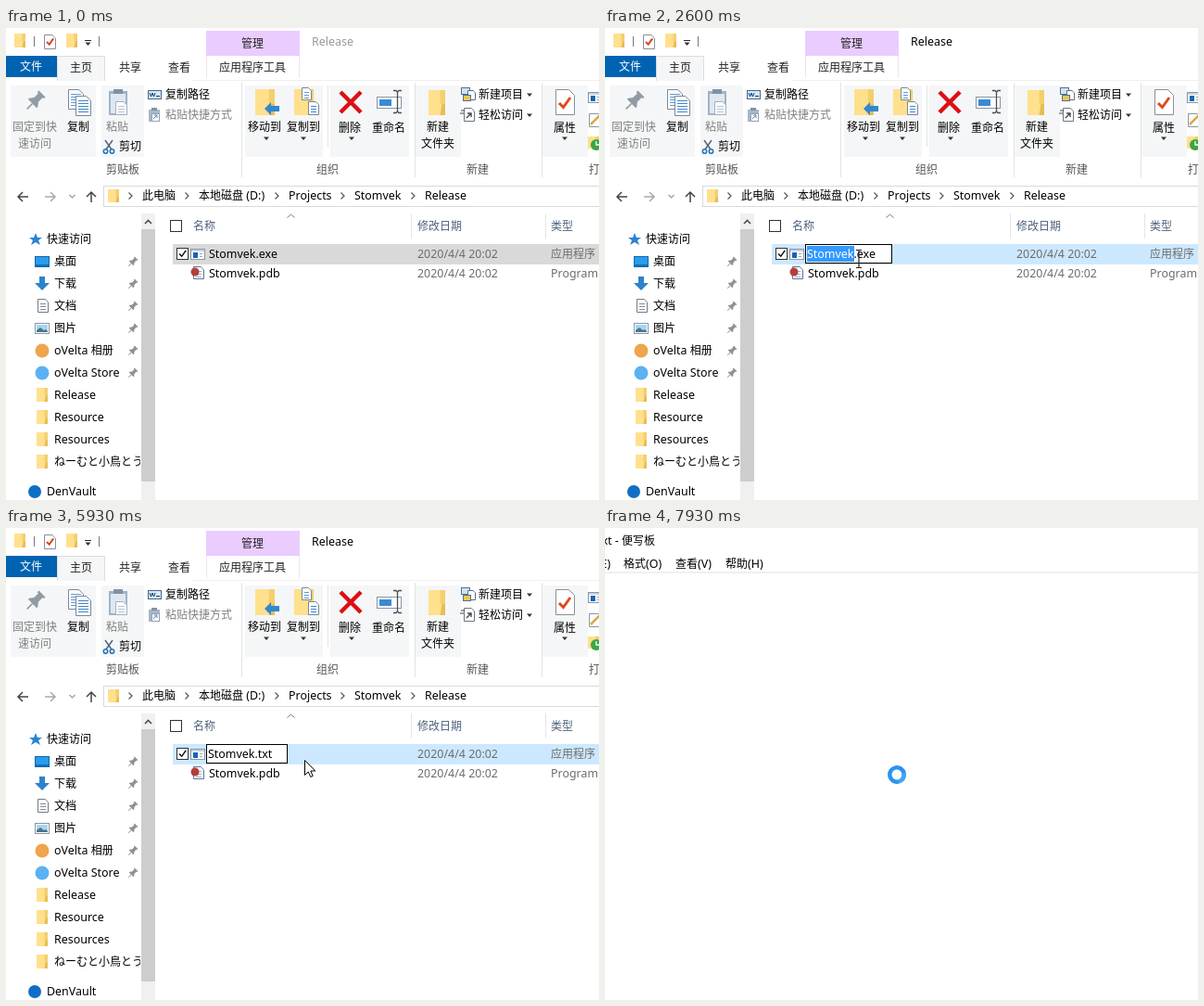
Recreate the animation shown at these times as an HTML page. Size 640 by 509 pixels, loop 8 s.

```html
<!DOCTYPE html>
<html lang="zh-CN">
<head>
<meta charset="utf-8">
<style>
html, body { margin: 0; width: 100%; height: 100%; overflow: hidden; background: #fff; }
svg { display: block; width: 100vw; height: 100vh; }
text { font: 12px "Noto Sans", "Noto Sans CJK SC", "Noto Sans CJK", sans-serif; white-space: pre; }
.l { font-size: 12.45px; }
.ime text { font: 17px "Liberation Mono", "Noto Sans CJK SC", "Noto Sans CJK", monospace; }
.ime .l { font-size: 15px; }
.ime .typed { font-weight: bold; font-size: 16px; }
</style>
</head>
<body>
<svg id="stage" viewBox="0 0 640 509" preserveAspectRatio="none"></svg>
<script>
const NAME = 'Stomvek';
const FPS = 15, FRAMES = 120;
const GREY = '#6d6d6d', DIM = '#808080', BLUE = '#1f74b8';

// ---- drawing helpers ----
const rect = (x, y, w, h, fill, more = '') => `<rect x="${x}" y="${y}" width="${w}" height="${h}" fill="${fill}" ${more}/>`;
const path = (d, fill, more = '') => `<path d="${d}" fill="${fill}" ${more}/>`;
const line = (d, color, w = 1, more = '') => path(d, 'none', `stroke="${color}" stroke-width="${w}" ${more}`);
const dot = (x, y, r, fill, more = '') => `<circle cx="${x}" cy="${y}" r="${r}" fill="${fill}" ${more}/>`;
const group = (id, body, more = '') => `<g id="${id}" ${more}>${body}</g>`;
const each = (list, fn) => list.map(fn).join('');
const runs = s => s.replace(/[\x20-\x7e]+/g, m => `<tspan class="l">${m}</tspan>`);
// y is the middle of the text line
const text = (x, y, s, fill = '#000', more = '') => `<text x="${x}" y="${y + 4}" fill="${fill}" ${more}>${runs(s)}</text>`;
const mid = (x, y, s, fill) => text(x, y, s, fill, 'text-anchor="middle"');

const frameBox = (x, y, w, h, color, fill = '#fff') => rect(x + .5, y + .5, w - 1, h - 1, fill, `stroke="${color}"`);
const caret = (x, y) => path(`M${x - 3} ${y - 1.5}h6l-3 3.5z`, '#333');
const chevron = (x, y, color = '#555') => line(`M${x - 1.5} ${y - 3.5}l3.5 3.5l-3.5 3.5`, color, 1.2);

function folder(x, y, w, h) {
  return rect(x, y, w, h, '#f3cf6e') + path(`M${x} ${y}h${w * .7}v${h * .55}h${w * .3}v${h * .45}h${-w}z`, '#ffe08c')
    + path(`M${x + w * .8} ${y + h * .55}h${w * .2}v${h * .45}h${-w * .3}z`, '#e8bd55');
}
function page(x, y, w, h, color = '#8a8f96', ink = '') {
  const f = w * .3;
  let s = path(`M${x + .5} ${y + .5}h${w - f}l${f} ${f}v${h - f}h${-w}z`, '#fff', `stroke="${color}"`);
  if (ink) for (let i = y + 5; i < y + h - 1; i += 3) s += rect(x + 3, i, w - 5, 1, ink);
  return s;
}
const tick = (x, y, s, color, w) => line(`M${x} ${y}l${3 * s} ${3 * s}l${5 * s} ${-7 * s}`, color, w);
const pin = (x, y, s, color) => `<g transform="translate(${x} ${y}) rotate(45) scale(${s})">`
  + path('M-3-6h6v1.5h-1v4l2 2.5v1h-8v-1l2-2.5v-4h-1z', color) + rect(-.5, 3, 1, 5, color) + '</g>';
const checkbox = (x, y) => frameBox(x, y, 13, 13, '#333');
const exeIcon = (x, y) => frameBox(x, y, 16, 12, '#8b96a3') + rect(x + 1, y + 1, 14, 2, '#c9d3dd')
  + rect(x + 3, y + 4, 5, 6, '#1565b5') + rect(x + 10, y + 5, 3, 1, '#9aa') + rect(x + 10, y + 8, 3, 1, '#9aa');

// ---- window chrome ----
function titleBar() {
  return folder(9, 6, 12, 15) + rect(30, 9, 1, 11, '#777')
    + page(41, 7, 12, 15) + tick(44, 15, .9, '#d8481f', 2)
    + folder(65, 6, 12, 15) + rect(85, 13, 7, 1, '#222') + caret(88.5, 17) + rect(100, 9, 1, 11, '#777')
    + group('tools', rect(216, 3, 101, 27, '#eaccff') + mid(266, 17, '管理', '#222')
      + rect(216, 30, 1, 24, '#efe3f7') + rect(316, 30, 1, 24, '#efe3f7') + mid(266, 43, '应用程序工具', '#222'))
    + text(330, 15, 'Release', '#999', 'id="title"');
}

function ribbon() {
  let s = rect(0, 30, 55, 23, '#0063b1') + mid(27, 42, '文件', '#fff')
    + rect(201, 56, 439, 1, '#f0f0f1')
    + path('M55.5 57V30.5h51V57', '#f5f6f7', 'stroke="#dcdddf"') + mid(81, 43, '主页', '#222')
    + mid(134, 43, '共享', '#222') + mid(187, 43, '查看', '#222');
  s += each([[5, 92, 77], [103, 46, 77], [258, 84, 77], [350, 85, 77], [442, 49, 77], [578, 50, 77]],
    ([x, w, h]) => rect(x, 62, w, h, '#f5f6f7'));
  s += each([254, 441, 578], x => rect(x, 59, 1, 102, '#e2e3e4')) + rect(347, 62, 1, 66, '#e2e3e4');
  s += each([[126, '剪贴板'], [347, '组织'], [509, '新建']], ([x, t]) => mid(x, 153, t, '#555')) + text(629, 153, '打开', '#555');

  // clipboard group
  s += pin(32, 78, 1.65, '#929ba4') + mid(31, 107, '固定到快', DIM) + mid(31, 125, '速访问', DIM);
  s += page(67, 66, 16, 21, '#7b8794', '#5b9bd5') + page(75, 73, 16, 21, '#7b8794', '#3c86cc') + mid(78, 107, '复制');
  s += rect(111, 68, 20, 26, '#9fb3c8') + rect(113, 71, 16, 21, '#dfe8f1') + rect(116, 66, 10, 5, '#7f91a5')
    + page(118, 79, 12, 14, '#9fb0c2', '#b4c2d1') + mid(120, 107, '粘贴', DIM);
  s += line('M107 121l7 10M115 121l-7 10', '#55657a', 1.5)
    + each([107.5, 114.5], x => dot(x, 133, 2.2, 'none', `stroke="${BLUE}" stroke-width="1.5"`)) + text(122, 128, '剪切');
  s += frameBox(153, 67, 15, 10, '#44688c', '#d7e8f7') + line('M155 70l1.5 4l1.5-4l1.5 4l1.5-4', '#123f6b') + rect(162, 73, 4, 1, '#123f6b')
    + text(172, 72, '复制路径');
  s += rect(154, 88, 12, 13, '#a9b6c4') + rect(157, 86, 6, 3, '#8492a2') + frameBox(157, 92, 9, 9, '#8fa2b5') + line('M159 98l4-4m-3 0h3v3', '#5b86b0')
    + text(172, 94, '粘贴快捷方式', DIM);

  // organise group
  s += folder(269, 66, 21, 28) + path('M279 87l7-7v4h9v6h-9v4z', '#3487cf') + mid(279, 107, '移动到') + caret(281, 119);
  s += folder(311, 66, 21, 28) + page(319, 64, 10, 13, '#7b8794', '#5b9bd5') + page(326, 79, 11, 14, '#7b8794', '#3c86cc')
    + mid(321, 107, '复制到') + caret(321, 119);
  s += line('M361 69l22 22M383 69l-22 22', '#dc0f14', 4.5) + mid(371, 108, '删除') + caret(373, 119);
  s += frameBox(400, 74, 27, 13, '#8795a5') + rect(403, 77, 13, 7, '#3b8ad0')
    + line('M418 67.5h3l1.5 1.5l1.5-1.5h3M422.500 69v21M418 91.500h3l1.500-1.500l1.500 1.500h3', '#4a4f55', 1.3) + mid(413, 108, '重命名');

  // new and open groups
  s += folder(456, 67, 18, 27) + mid(466, 107, '新建') + mid(466, 125, '文件夹');
  s += frameBox(491, 64, 10, 8, '#55708c', '#cfe3f5') + page(498, 67, 8, 10, '#55708c') + frameBox(493, 72, 9, 7, '#55708c', '#e9c75d')
    + text(510, 72, '新建项目') + caret(565, 72);
  s += page(494, 86, 11, 14, '#6b7684') + line('M497 97l5-5m-4 0h4v4', '#444', 1.4) + line('M491 89h4M490 92h4', '#444')
    + text(510, 94, '轻松访问') + caret(565, 94);
  s += page(593, 66, 20, 27) + tick(597, 81, 1.5, '#dd4b21', 3) + mid(603, 108, '属性') + caret(603, 119);
  s += group('openExe', exeIcon(628, 69)) + group('openTxt', rect(629, 68, 14, 13, '#45a5b5') + line('M631 71h10M631 74h10M631 77h10', '#d9f2f5'));
  s += page(629, 92, 14, 14, '#8796a6') + line('M631 104l10-10', '#d8a94a', 2.5)
    + folder(628, 117, 12, 13) + dot(637, 126, 6, '#3da545') + line('M637 122v4h3', '#fff', 1.3);
  return s;
}

function addressBar() {
  const crumbs = [[147, '此电脑', 195], [208, '本地磁盘 (D:)', 292], [305, 'Projects', 363], [376, NAME, 439], [452, 'Release']];
  return line('M24 182H13m5-5l-5 5l5 5', '#444', 1.5) + line('M42 182h11m-5-5l5 5l-5 5', '#aaa', 1.5)
    + line('M68.500 180l3 3l3-3', '#999', 1.2) + line('M92 188v-11m-5 5l5-5l5 5', '#444', 1.5)
    + frameBox(105, 170, 540, 23, '#d9d9d9') + folder(110, 174, 12, 14) + chevron(134, 181)
    + each(crumbs, ([x, t, c]) => text(x, 181, t) + (c ? chevron(c, 181) : ''));
}

function sidebar() {
  const names = ['桌面', '下载', '文档', '图片', 'oVelta 相册', 'oVelta Store', 'Release', 'Resource', 'Resources', 'ねーむと小鳥とう'];
  let s = path('M32 221l2 5h5l-4 3l2 5l-5-3l-5 3l2-5l-4-3h5z', '#2b83cf') + text(44, 228, '快速访问');
  names.forEach((n, i) => {
    const y = 252 + 24 * i;
    s += text(52, y, n, '#000', 'clip-path="url(#side)"');
    if (i < 6) s += pin(137, y, .85, '#8a9299');
    else s += folder(33, y - 8, 12, 15);
  });
  s += frameBox(31, 246, 16, 12, '#0e67ac', '#2a9cec') + rect(32, 255, 14, 2, '#1270b8');
  s += path('M36 268h6v7h5l-8 8l-8-8h5z', '#2d83cc');
  s += page(34, 292, 11, 14, '#707a85', '#7e8c9a');
  s += frameBox(31, 318, 16, 12, '#8795a3') + rect(33, 320, 12, 8, '#a9d4f1') + path('M33 328v-2l4-3l4 3l2-1l2 2v1z', '#47758f');
  s += dot(39, 348, 7.500, '#f0a44b') + dot(39, 372, 7.500, '#5cb1f3') + dot(31, 500, 7, '#0f6fc4') + text(44, 500, 'DenVault');
  return s + rect(146, 200, 15, 309, '#f0f0f0') + rect(146, 217, 15, 272, '#cdcdcd') + line('M150 211l3.500-3.500l3.500 3.500', '#505050', 1.6);
}

function fileList() {
  const head = '#4c607a', date = '2020/4/4 20:02';
  return checkbox(177, 207) + text(202, 214, '名称', head) + text(444, 214, '修改日期', head) + text(588, 214, '类型', head)
    + line('M303.500 204.500l4-3.500l4 3.500', '#777') + rect(437, 200, 1, 27, '#e5e5e5') + rect(582, 200, 1, 27, '#e5e5e5')
    + group('other', rect(180, 254, 460, 22, '#e5f3ff', 'id="hover"') + page(202, 257, 11, 13, '#5d7396', '#9db0cc')
      + dot(204, 263, 4.500, '#b2403c') + text(219, 265, NAME + '.pdb') + text(444, 265, date, GREY) + text(588, 265, 'Program Debug', GREY))
    + group('file', rect(180.5, 233.5, 470, 21, '#d9d9d9', 'id="sel"') + checkbox(184, 237) + tick(187, 243.5, .9, '#111', 1.5)
      + group('exeIcon', exeIcon(199, 238)) + group('txtIcon', page(201, 236, 11, 14, '#9a9a9a', '#a8a8a8'))
      + text(219, 244, '', '#000', 'id="name"') + text(444, 244, date, GREY) + text(588, 244, '', GREY, 'id="kind"'))
    + group('edit', frameBox(216, 233, 94, 21, '#000').replace('<rect', '<rect id="editBox"')
      + rect(218, 235, 51, 17, '#3399ff', 'id="mark"') + text(218, 244, '', '#000', 'id="editText"')
      + rect(292, 235, 1, 17, '#000', 'id="caret"'));
}

// ---- input method panel ----
function flower(x, y, r) {
  let s = '';
  for (let i = 0; i < 5; i++)
    s += `<ellipse cy="${-r * .58}" rx="${r * .36}" ry="${r * .46}" fill="#fbfcfd" stroke="#b9c3cc" stroke-width=".7" transform="rotate(${72 * i + 15})"/>`;
  return `<g transform="translate(${x} ${y})">${s}${dot(0, 0, r * .2, '#cfd6dc')}</g>`;
}
function imePanel() {
  let s = rect(303, 268, 360, 62, '#8e9aa5', 'rx="9" opacity=".45"') + rect(304.5, 267.5, 360, 60, 'url(#sky)', 'rx="8" stroke="#d9eefb" stroke-width="1.500"');
  for (let i = 0; i < 26; i++)
    s += dot(396 + (i * 67) % 244, 274 + (i * 29) % 50, 1.5 + i % 3, '#d5effd', 'opacity=".6"');
  s += rect(392, 299, 250, 21, '#d2ebfa', 'opacity=".6"') + rect(308, 325, 332, 1, '#5c9fce');
  s += path('M313 327C311 300 322 269 350 268C380 269 384 304 392 327z', '#d5c4bf');
  s += each([[455, 266], [508, 268], [571, 266], [627, 268]], ([x, y]) => flower(x, y, 12) + flower(x - 14, y + 8, 9) + flower(x + 14, y + 6, 7));
  s += flower(307, 321, 13) + flower(299, 323, 6);
  s += `<text id="typed" class="typed" x="388" y="292" fill="#2d73a6"></text>` + rect(417, 279, 1, 15, '#1d3f58', 'id="imeCaret"');
  return s + each([[392, '1.TXT', '#d22a2a'], [451, '2.调戏他'], [536, '3.提醒他'], [622, '4.提现']],
    ([x, t, c]) => text(x, 311, t, c || '#4b7896'));
}

// ---- editor window ----
function editor() {
  return rect(0, 0, 640, 509, '#fff') + text(54, 14, NAME + '.txt - 便写板', '#000', 'text-anchor="end"')
    + text(6, 39, '编辑(E)', '#000', 'text-anchor="end"')
    + each([[20, '格式(O)'], [76, '查看(V)'], [130, '帮助(H)']], ([x, t]) => text(x, 39, t))
    + rect(0, 47, 640, 2, '#efefef');
}
const ring = (r, w) => dot(0, 0, r, 'none', `stroke="#2a94f0" stroke-width="${w}"`)
  + line(`M0 ${-r}A${r} ${r} 0 0 1 ${r} 0`, '#45a5f5', w);

const stage = document.getElementById('stage');
stage.innerHTML = `<defs><clipPath id="side"><rect y="200" width="145" height="309"/></clipPath>
  <linearGradient id="sky" x2="0" y2="1"><stop stop-color="#8bc9f2"/><stop offset=".5" stop-color="#a5d7f6"/><stop offset="1" stop-color="#7fbfea"/></linearGradient></defs>`
  + rect(0, 0, 640, 509, '#fff') + titleBar() + ribbon() + addressBar() + sidebar() + fileList()
  + group('ime', imePanel(), 'class="ime"') + group('editor', editor())
  + group('busy', ring(6.5, 3.5)) + group('wait', ring(7.75, 4.5))
  + group('arrow', path('M.5.5V16.500L4.300 13L6.800 18.500L9.200 17.400L6.800 12H11.800Z', '#fff', 'stroke="#000"'))
  + group('beam', line('M-3-9.500h2.500l.5.5l.5-.5h2.500M0-9V9M-3 9.500h2.500l.5-.5l.5.5h2.500', '#222', 1.2));

// ---- animation ----
const el = {};
stage.querySelectorAll('[id]').forEach(e => el[e.id] = e);
const set = (id, attrs) => { for (const k in attrs) el[id].setAttribute(k, attrs[k]); };
const show = (id, on) => set(id, { display: on ? 'inline' : 'none' });
const write = (id, s) => { el[id].innerHTML = runs(s); };

// pointer keys: step, x, y
const track = [[3, 44, 370], [9, 380, 250], [15, 373, 241], [18, 88, 509], [30, 88, 509], [34, 280, 249], [37, 280, 249],
  [39, 274, 249], [42, 274, 249], [47, 322, 250], [104, 322, 250], [105, 322, 258], [108, 322, 265], [120, 322, 265]];
function pointer(n) {
  const i = track.findIndex(k => k[0] > n);
  if (i < 1) return [-50, -50];
  const [a, b] = [track[i - 1], track[i]];
  const u = (n - a[0]) / (b[0] - a[0]), e = u * u * (3 - 2 * u);
  return [a[1] + (b[1] - a[1]) * e, a[2] + (b[2] - a[2]) * e];
}

function draw(ms) {
  const n = Math.floor((ms + 4) * FPS / 1000) % FRAMES;
  const within = (a, b) => n >= a && n < b;
  const renamed = n >= 67, moved = n >= 96, opened = n >= 115, editing = within(35, 93);

  set('title', { x: n >= 95 ? 108 : 330, fill: n < 12 || within(71, 89) ? '#999' : '#000' });
  show('tools', n < 95);
  show('openExe', n < 95);
  show('openTxt', n >= 95);

  set('file', { transform: `translate(0 ${moved ? 21 : 0})` });
  set('other', { transform: `translate(0 ${moved ? -21 : 0})` });
  show('hover', within(96, 105));
  const fill = n < 8 ? '#d9d9d9' : '#cce8ff';
  const edged = within(8, 35) || within(45, 71) || n >= 105;
  set('sel', { fill, stroke: edged ? '#99d1ff' : fill });
  show('exeIcon', !moved);
  show('txtIcon', moved);
  write('name', editing ? '' : NAME + (renamed ? '.txt' : '.exe'));
  write('kind', moved ? '文本文档' : '应用程序');

  show('edit', editing);
  set('editBox', { width: renamed ? 87 : 93 });
  const white = s => `<tspan class="l" fill="#fff">${s}</tspan>`, plain = runs;
  el.editText.innerHTML = renamed ? plain(NAME + '.txt')
    : n < 44 ? white(NAME) + plain('.exe') : plain(NAME + '.') + white('exe');
  set('mark', n < 44 ? { x: 218, width: 51 } : { x: 272, width: 21 });
  show('mark', !renamed);
  set('caret', { x: renamed ? 286 : 292 });
  show('caret', within(46, 55) || within(69, 73) || within(90, 93));

  show('ime', within(59, 67));
  const typed = n < 61 ? 't' : n < 62 ? 'tx' : 'txt';
  el.typed.textContent = typed;
  set('imeCaret', { x: 388 + 9.7 * typed.length });

  show('editor', opened);
  set('editor', { opacity: Math.min(1, .4 + (n - 115) * .35) });

  const [x, y] = pointer(n), beam = within(35, 44);
  const place = `translate(${Math.round(x)} ${Math.round(y)})`;
  show('arrow', !beam && !opened && !within(18, 30));
  show('beam', beam);
  set('arrow', { transform: place });
  set('beam', { transform: place });
  show('busy', within(113, 115));
  show('wait', opened);
  set('busy', { transform: `translate(330.5 265.5) rotate(${n * 40})` });
  set('wait', { transform: `translate(315 266) rotate(${n * 40})` });
}

function tick_() {
  draw(performance.now() % (FRAMES / FPS * 1000));
  requestAnimationFrame(tick_);
}
tick_();
</script>
</body>
</html>
```
